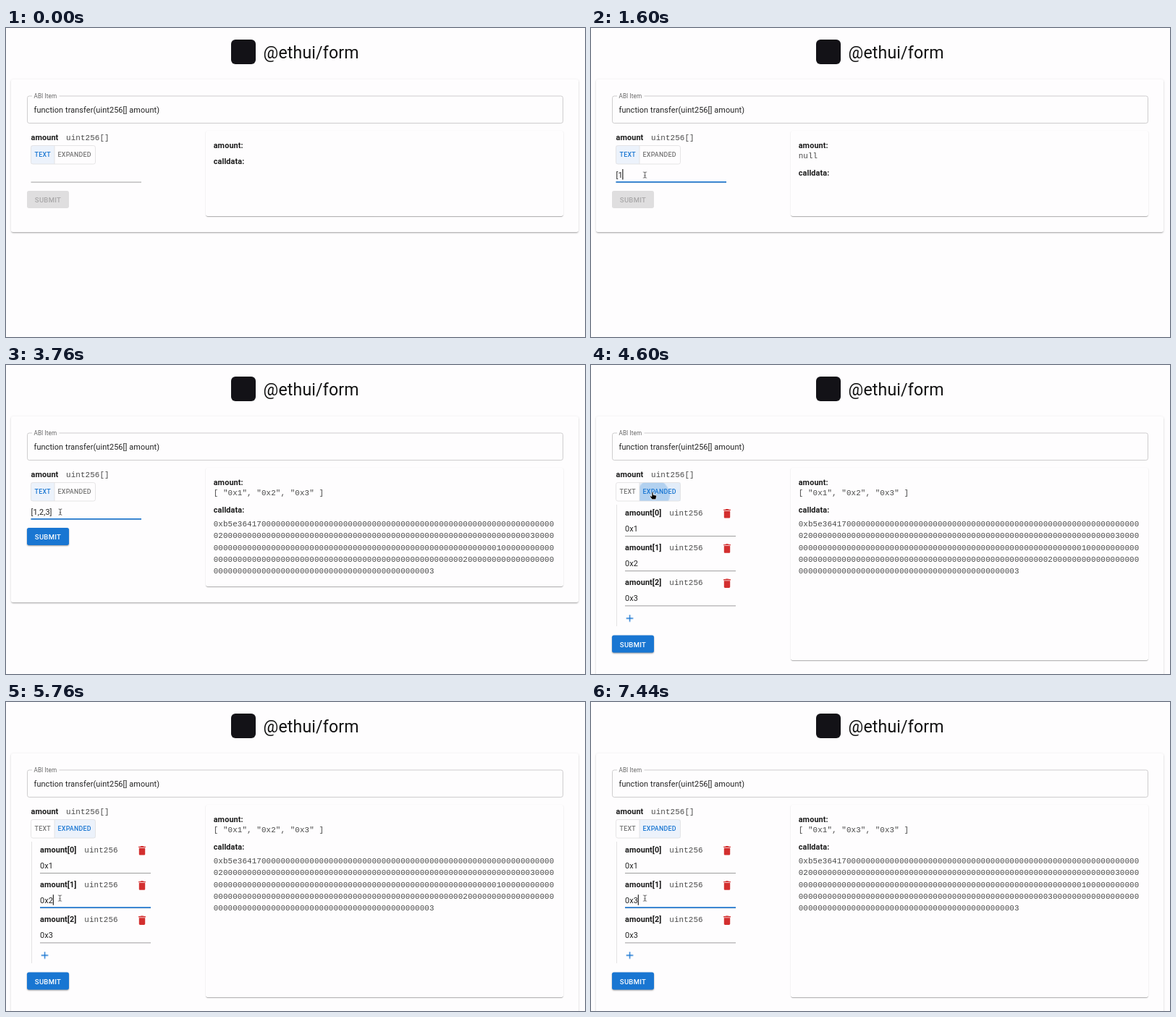
Recreate the animation shown at these times as an HTML page. Size 800 by 427 pixels, loop 8 s.

```html
<!DOCTYPE html>
<html lang="en">
<head>
<meta charset="utf-8">
<title>@ethui/form</title>
<style>
  html, body { margin: 0; width: 100%; height: 100%; overflow: hidden; background: #fefdfe; }
  #stage { position: absolute; left: 0; top: 0; width: 800px; height: 427px; overflow: hidden; }
  #stage > * { position: absolute; box-sizing: border-box; }
  svg { left: 0; top: 0; }
  text, .submit { font-family: Roboto, sans-serif; white-space: pre; }
  text { font-size: 10.88px; letter-spacing: .00938em; fill: #222; }
  .b { font-weight: 700; fill: #1c1c1c; }
  .m { font-family: "Liberation Mono", monospace; fill: #4a4a4a; }
  .tab { font-size: 8.84px; font-weight: 500; letter-spacing: .02857em; }
  .line { fill: #949394; }
  .hover { fill: #222; }
  .blue { fill: #1976d2; }
  .grey { fill: #757575; }

  /* one loop: 1% = 80 ms */
  .a { animation: 8s step-end infinite; }
  .paper { background: #fefdfe; border-radius: 2.7px; }
  .card {
    left: 7px; top: 71px; width: 784px; animation-name: card;
    box-shadow: 0 2px .7px -1.4px #0003, 0 1.4px 1.4px #00000024, 0 .7px 3.4px #0000001f;
  }
  .panel {
    left: 276px; top: 142px; width: 494px; animation-name: panel;
    box-shadow: 0 1.4px .7px -.7px #0003, 0 .7px .7px #00000024, 0 .7px 2px #0000001f;
  }
  .submit {
    left: 29px; top: 224.5px; width: 58px; height: 24.5px; border-radius: 2.7px;
    font: 500 9.52px/25px Roboto, sans-serif; letter-spacing: .02857em; text-align: center;
    animation: drop 8s step-end infinite, enable 8s cubic-bezier(.4,0,.2,1) infinite;
  }
  .list {
    left: 96px; top: 219.5px; width: 106.5px; height: 153px; padding: 2.7px 8px;
    border-radius: 4px; background: #fefdfe; box-shadow: 0 0 1px #0006, 0 1px 3px #0003;
    font: 11.5px/24.5px "Noto Sans", sans-serif; color: #2a2a2a;
    animation: list 8s linear infinite;
  }
  .focus { transform-box: fill-box; transform-origin: center; animation: 8s cubic-bezier(0,0,.2,1) infinite; }
  .ripple { transform-box: fill-box; transform-origin: center; animation: grow 8s cubic-bezier(.4,0,.2,1) infinite, fade 8s cubic-bezier(.4,0,.2,1) infinite; }
  .mouse { animation: move 8s ease-in-out infinite; }

  @keyframes card { 0% { height: 210.5px } 36% { height: 257px } 56.5%, 100% { height: 380px } }
  @keyframes panel { 0% { height: 118px } 36% { height: 164px } 56.5%, 100% { height: 266px } }
  @keyframes drop { 0% { transform: none } 56.5%, 100% { transform: translateY(148.5px) } }
  @keyframes enable {
    0%, 36% { background: #dfdedf; color: #a9a8a9; box-shadow: 0 1px 2px #0000 }
    39.1%, 76% { background: #1976d2; color: #fff; box-shadow: 0 1px 2px #0006 }
    78% { background: #a0bbda; color: #c4c8cd; box-shadow: 0 1px 2px #0002 }
    81.1%, 100% { background: #1976d2; color: #fff; box-shadow: 0 1px 2px #0006 }
  }
  @keyframes list { 0%, 11.49% { opacity: 0 } 11.5%, 15% { opacity: 1 } 17.5%, 100% { opacity: 0 } }

  @keyframes textMode { 0% { opacity: 1 } 56.5%, 100% { opacity: 0 } }
  @keyframes rowMode { 0% { opacity: 0 } 56.5%, 100% { opacity: 1 } }
  @keyframes empty { 0% { opacity: 1 } 15%, 100% { opacity: 0 } }
  @keyframes filled { 0% { opacity: 0 } 15%, 100% { opacity: 1 } }
  @keyframes invalid { 0% { opacity: 0 } 15% { opacity: 1 } 36% { opacity: 0 } 76% { opacity: 1 } 78%, 100% { opacity: 0 } }
  @keyframes before { 0% { opacity: 0 } 36% { opacity: 1 } 76%, 100% { opacity: 0 } }
  @keyframes after { 0% { opacity: 0 } 78%, 100% { opacity: 1 } }

  @keyframes typing {
    0% { transform: translateX(0) } 14.5% { transform: translateX(3px) }
    20% { transform: translateX(9.2px) } 22% { transform: translateX(11.4px) }
    24.5% { transform: translateX(17.6px) } 30% { transform: translateX(19.9px) }
    31.5% { transform: translateX(26.1px) } 35.5%, 100% { transform: translateX(29.1px) }
  }
  @keyframes caret1 { 0% { opacity: 0 } 10.75% { opacity: 1 } 43.5% { opacity: 0 } 51% { opacity: 1 } 55%, 100% { opacity: 0 } }
  @keyframes caret2 {
    0% { opacity: 0; transform: none } 68.5% { opacity: 1; transform: none }
    76% { opacity: 1; transform: translateX(-6.2px) } 78% { opacity: 1; transform: none }
    85.5% { opacity: 0; transform: none } 93%, 100% { opacity: 1; transform: none }
  }
  @keyframes hover1 { 0% { opacity: 0 } 8.25% { opacity: 1 } 13.5%, 100% { opacity: 0 } }
  @keyframes hover2 { 0% { opacity: 0 } 67.5% { opacity: 1 } 71.5%, 100% { opacity: 0 } }
  @keyframes focus1 { 0%, 10.75% { transform: scaleX(0) } 13.25%, 55% { transform: none } 57.5%, 100% { transform: scaleX(0) } }
  @keyframes focus2 { 0%, 68.5% { transform: scaleX(0) } 71%, 100% { transform: none } }

  @keyframes tabHover { 0% { opacity: 0 } 49.5% { opacity: .04 } 56.5%, 100% { opacity: 0 } }
  @keyframes tabOn { 0% { opacity: 0 } 56.5% { opacity: .12 } 65%, 100% { opacity: .08 } }
  @keyframes grow { 0%, 55% { transform: scale(0) } 61.9%, 100% { transform: none } }
  @keyframes fade { 0%, 54.9% { opacity: 0 } 55%, 57% { opacity: .24 } 64%, 100% { opacity: 0 } }

  @keyframes move {
    0%, 4.75% { transform: translate(4px, 256px) } 9.5%, 43.5% { transform: translate(74.5px, 203px) }
    44%, 47% { transform: translate(75px, 203px) } 51.5%, 64.5% { transform: translate(86px, 181px) }
    68%, 100% { transform: translate(74.5px, 271px) }
  }
  @keyframes arrow { 0% { opacity: 0 } 4.75% { opacity: 1 } 8% { opacity: 0 } 48% { opacity: 1 } 49.5% { opacity: 0 } 65% { opacity: 1 } 67%, 100% { opacity: 0 } }
  @keyframes beam { 0% { opacity: 0 } 8% { opacity: 1 } 48% { opacity: 0 } 67%, 100% { opacity: 1 } }
  @keyframes hand { 0% { opacity: 0 } 49.5% { opacity: 1 } 65%, 100% { opacity: 0 } }
</style>
</head>
<body>
<div id="stage">
  <div class="paper card a"></div>
  <div class="paper panel a"></div>

  <svg width="800" height="427" viewBox="0 0 800 427">
    <defs>
      <clipPath id="tabClip"><rect x="67" y="162.5" width="56.5" height="25.5"/></clipPath>
      <path id="bin" fill="#d32f2f" transform="translate(179.6 196.9) scale(.7)"
        d="M6 19c0 1.1.9 2 2 2h8c1.1 0 2-.9 2-2V7H6zM19 4h-3.5l-1-1h-5l-1 1H5v2h14z"/>
    </defs>

    <rect x="311" y="16" width="34" height="34" rx="6" fill="#131217"/>
    <text x="355.5" y="42" style="font-size:23.1px;letter-spacing:.00735em;fill:#111">@ethui/form</text>

    <rect x="29.5" y="94" width="740" height="37.5" rx="2.7" fill="none" stroke="#c9c8c9" stroke-width=".9"/>
    <rect x="36" y="92" width="37.5" height="4" fill="#fefdfe"/>
    <text x="38.5" y="96.8" style="font-size:8.16px;fill:#666">ABI Item</text>
    <text x="38.5" y="117">function transfer(uint256[] amount)</text>

    <text class="b" x="34.5" y="155.3">amount</text>
    <text class="m" x="83" y="155.3">uint256[]</text>

    <rect class="a blue" style="animation-name:textMode" x="34.5" y="162.5" width="32.5" height="25.5" fill-opacity=".08"/>
    <rect class="a" style="animation-name:tabHover" x="67" y="162.5" width="56.5" height="25.5"/>
    <rect class="a blue" style="animation-name:tabOn" x="67" y="162.5" width="56.5" height="25.5"/>
    <g clip-path="url(#tabClip)"><circle class="ripple blue" cx="86" cy="180" r="42"/></g>
    <path d="M67 162.5V188" stroke="#e0dfe0" stroke-width=".8"/>
    <rect x="34.5" y="162.5" width="89" height="25.5" rx="2.7" fill="none" stroke="#e0dfe0" stroke-width=".8"/>
    <g class="a" style="animation-name:textMode">
      <text class="tab blue" x="39.6" y="178.2">TEXT</text>
      <text class="tab grey" x="71.6" y="178.2">EXPANDED</text>
    </g>
    <g class="a" style="animation-name:rowMode">
      <text class="tab grey" x="39.6" y="178.2">TEXT</text>
      <text class="tab blue" x="71.6" y="178.2">EXPANDED</text>
    </g>

    <g class="a" style="animation-name:textMode">
      <text x="34.5" y="206.5">[1,2,3]</text>
      <g class="a" style="animation-name:typing">
        <rect x="34.5" y="194" width="34" height="17" fill="#fefdfe"/>
        <rect class="a" style="animation-name:caret1" x="34.2" y="195" width="1" height="14.5"/>
      </g>
      <rect class="line" x="34.5" y="212.6" width="152.5" height=".9"/>
      <rect class="a hover" style="animation-name:hover1" x="34.5" y="212" width="152.5" height="1.6"/>
      <rect class="focus blue" style="animation-name:focus1" x="34.5" y="212" width="152.5" height="1.6"/>
    </g>

    <g class="a" style="animation-name:rowMode">
      <rect x="35" y="193" width=".8" height="168" fill="#dddcdd"/>
      <g id="rows"></g>
      <g class="a" style="animation-name:caret2"><rect x="64.8" y="266.2" width="1" height="14.5"/></g>
      <rect class="a hover" style="animation-name:hover2" x="47" y="283.2" width="153" height="1.6"/>
      <rect class="focus blue" style="animation-name:focus2" x="47" y="283.2" width="153" height="1.6"/>
      <path class="blue" transform="translate(45.3 341.9) scale(.68)" d="M19 13h-6v6h-2v-6H5v-2h6V5h2v6h6z"/>
    </g>

    <text class="b" x="286.7" y="166">amount:</text>
    <text class="b a" style="animation-name:empty" x="286.7" y="188">calldata:</text>
    <text class="b a" style="animation-name:filled" x="286.7" y="204.2">calldata:</text>
    <text class="m a" style="animation-name:invalid" x="286.7" y="179.6">null</text>
    <g id="before" class="a" style="animation-name:before"></g>
    <g id="after" class="a" style="animation-name:after"></g>
  </svg>

  <div class="submit">SUBMIT</div>
  <div class="list">50000<br>5,000<br>3890<br>216<br>10,000<br>10,000.00</div>

  <svg width="800" height="427" viewBox="0 0 800 427">
    <g class="mouse">
      <path class="a" style="animation-name:arrow" d="M-2-4V5L0 3.2 1.4 6.2 2.8 5.6 1.5 2.7H4.2Z" stroke="#fff" stroke-width=".7"/>
      <path class="a" style="animation-name:beam" d="M-2.3-4Q0-4 0-2.7Q0-4 2.3-4M0-2.7V2.9M-2.3 4.2Q0 4.2 0 2.9Q0 4.2 2.3 4.2M-1.1.9H1.1" fill="none" stroke="#444" stroke-width=".9"/>
      <path class="a" style="animation-name:hand" d="M-2-4.4a1 1 0 0 1 2 0V-1.6L3.4-.9Q4.6-.6 4.4.7L3.6 4.8H-1.6L-4.4.9Q-4.6-.6-3.3-.2L-2 .7Z" stroke="#fff" stroke-width=".7"/>
    </g>
  </svg>
</div>

<script>
  const ns = 'http://www.w3.org/2000/svg';
  const byId = id => document.getElementById(id);

  function add(parent, tag, attrs, content = '') {
    const el = document.createElementNS(ns, tag);
    for (const key in attrs) el.setAttribute(key, attrs[key]);
    el.textContent = content;
    parent.appendChild(el);
    return el;
  }

  // ABI encoding: selector, offset, length, items
  function encode(values) {
    const words = [32, values.length, ...values];
    return '0xb5e36417' + words.map(n => n.toString(16).padStart(64, '0')).join('');
  }

  function result(id, values) {
    const group = byId(id), x = 286.7, perLine = 71;
    const items = values.map(n => `"0x${n}"`).join(', ');
    add(group, 'text', { class: 'm', x, y: 179.6 }, `[ ${items} ]`);
    encode(values).match(new RegExp(`.{1,${perLine}}`, 'g')).forEach((line, i) =>
      add(group, 'text', { class: 'm', x, y: 222.8 + i * 16.4 }, line));
  }

  function row(i) {
    const g = add(byId('rows'), 'g', { transform: `translate(0 ${i * 48.2})` });
    add(g, 'text', { class: 'b', x: 47, y: 207.8 }, `amount[${i}]`);
    add(g, 'text', { class: 'm', x: 108.3, y: 207.8 }, 'uint256');
    add(g, 'use', { href: '#bin' });
    add(g, 'rect', { class: 'line', x: 47, y: 236, width: 153, height: .9 });
    if (i !== 1) {
      add(g, 'text', { x: 47, y: 229.6 }, `0x${i + 1}`);
      return;
    }
    add(g, 'text', { x: 47, y: 229.6 }, '0x');
    const digit = { x: 58.7, y: 229.6, class: 'a' };
    add(g, 'text', { ...digit, style: 'animation-name:before' }, '2');
    add(g, 'text', { ...digit, style: 'animation-name:after' }, '3');
  }

  [0, 1, 2].forEach(row);
  result('before', [1, 2, 3]);
  result('after', [1, 3, 3]);
</script>
</body>
</html>
```
